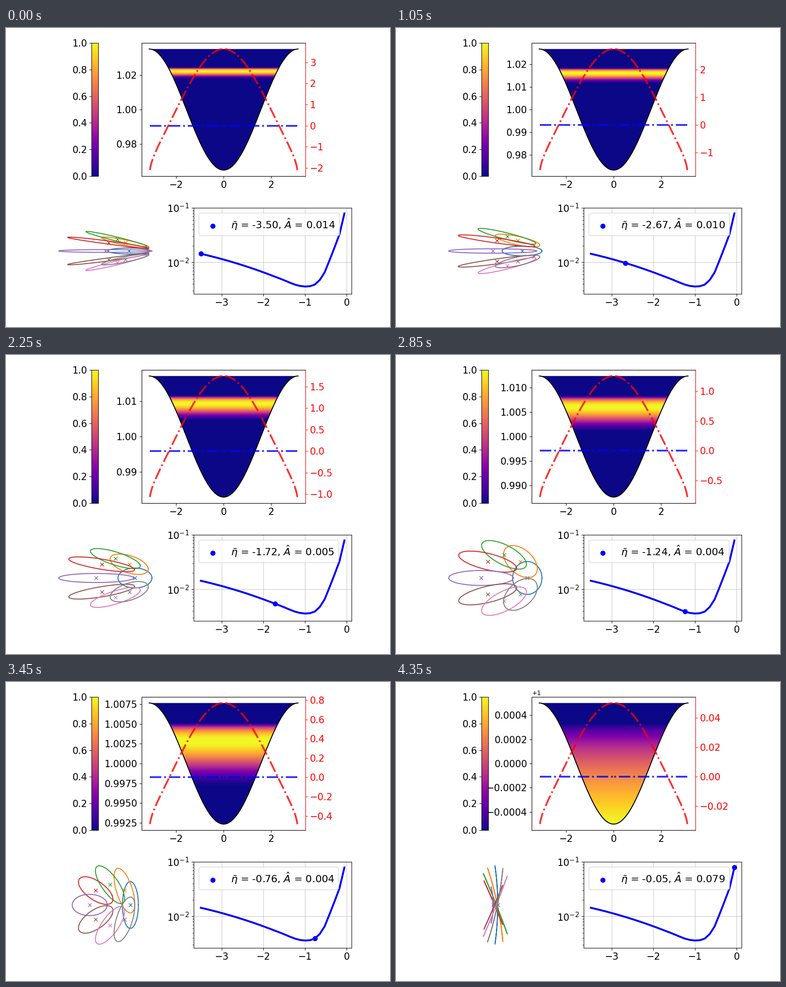
These frames come from a looping animation (849 px wide and 660 px high, 4.5 s). A matplotlib script:

```python
import numpy as np
import matplotlib.pyplot as plt
from matplotlib.animation import FuncAnimation
from matplotlib.patches import Polygon

W, H, DPI = 849, 660, 100
FRAMES, INTERVAL = 30, 150
TICK, TEXT = 15, 16
ETAS = np.linspace(-3.5, -0.05, FRAMES)
R_WELL, R_SURF = 0.01, 0.03      # radii for the field well and the surfaces
AMP, NFP = 0.045, 3              # helical axis: amplitude and field periods
MODES = 16
CUTOFF, FALLOFF = 0.52, 1.8      # drift at which the energy vanishes


# ---- magnetic axis and its surfaces ---------------------------------------
def axis_frame(phi):
    """Position, speed, curvature, torsion, normal and binormal of the axis."""
    c, s = AMP * np.cos(NFP * phi), AMP * np.sin(NFP * phi)
    R, n = 1 + c, NFP
    d1 = np.array([-n * s, R, n * c])
    d2 = np.array([-n**2 * c - R, -2 * n * s, -n**2 * s])
    d3 = np.array([n**3 * s + 3 * n * s, -3 * n**2 * c - R, -n**3 * c])
    cross = np.cross(d1, d2, axis=0)
    speed = np.sqrt((d1**2).sum(0))
    size = np.sqrt((cross**2).sum(0))
    b = cross / size
    normal = np.cross(b, d1 / speed, axis=0)
    return R, s, speed, size / speed**3, (cross * d3).sum(0) / size**2, normal, b


def solve_sigma(etas):
    """Sine coefficients of sigma for each eta, by Newton with warm starts."""
    k = NFP * np.arange(1, MODES + 1)
    phi = np.linspace(0, np.pi / NFP, MODES + 1)
    S, D = np.sin(np.outer(phi, k)), k * np.cos(np.outer(phi, k))
    G = axis_frame(np.linspace(0, 2 * np.pi, 600, endpoint=False))[2].mean()
    _, _, speed, kappa, tau, _, _ = axis_frame(phi)
    x, out = np.zeros(MODES + 1), []
    for eta in etas:
        q = (eta / kappa)**2
        for _ in range(15):
            iota, sig = x[0], S @ x[1:]
            h = q**2 + 1 + sig**2
            res = G / speed * (D @ x[1:]) + iota * h + 2 * q * tau * G
            jac = np.column_stack([h, (G / speed)[:, None] * D
                                   + 2 * iota * sig[:, None] * S])
            x = x - np.linalg.solve(jac, res)
        out.append(x[1:].copy())
    return out


def sections(eta, coef, count=8, points=121):
    """Surface cuts at fixed cylindrical angles over one field period."""
    target = (2 * np.pi / NFP * np.arange(count) / count)[:, None]
    th = np.linspace(0, 2 * np.pi, points)[None, :]
    k = NFP * np.arange(1, MODES + 1)
    phi = target + 0 * th
    for _ in range(50):
        R, Z, _, kappa, _, n, b = axis_frame(phi)
        sig = np.sin(phi[..., None] * k) @ coef
        X = R_SURF * eta / kappa * np.cos(th)
        Y = R_SURF * kappa / eta * (np.sin(th) + sig * np.cos(th))
        p = X * n + Y * b
        miss = phi + np.arctan2(p[1], R + p[0]) - target
        phi = phi - 0.7 * miss
    return np.hypot(R + p[0], p[1]), Z + p[2]


SIGMAS = solve_sigma(ETAS[::-1])[::-1]
CUTS = [sections(e, c) for e, c in zip(ETAS, SIGMAS)]
CUT_PHI = 2 * np.pi / NFP * np.arange(8) / 8
AXIS_R, AXIS_Z = 1 + AMP * np.cos(NFP * CUT_PHI), AMP * np.sin(NFP * CUT_PHI)

# ---- trapped particle drift ------------------------------------------------
BOUNCE = np.linspace(3.1126, 0, 160)
QUAD = (np.arange(1200) + 0.5) / 1200 * np.pi / 2
K2SIN2 = (np.sin(BOUNCE / 2)[:, None] * np.sin(QUAD))**2
DEPTH = -np.cos(BOUNCE)
ROWS = np.linspace(-1, 1, 400)


def drift(eta):
    """Bounce-averaged drift and bounce time for each turning point."""
    eps = R_WELL * abs(eta)
    c = 1 - 2 * K2SIN2
    B = 1 - eps * c
    w = 1 / (B * np.sqrt(1 - K2SIN2))
    lam = 1 / (1 + eps * DEPTH)[:, None]
    time = w.mean(1)
    return abs(eta) * (c * (2 / B - lam) * w).mean(1) / time, time


def energy(omega, time):
    e = time * np.clip(omega, 0, None) * np.clip(CUTOFF - omega, 0, None)**FALLOFF
    e = np.interp(ROWS, DEPTH[::-1], e[::-1])
    return (e / e.max())[:, None]


# ---- total available energy, as log10 per eta ------------------------------
smooth = np.polyfit([0, 7, 11, 15], [-1.842, -2.011, -2.129, -2.263], 3)
LOG_A = np.concatenate([np.polyval(smooth, np.arange(16)), [
    -2.297, -2.334, -2.372, -2.407, -2.431, -2.442, -2.437,
    -2.407, -2.324, -2.183, -1.959, -1.726, -1.485, -1.102]])
A_HAT = 10**LOG_A

# ---- figure ----------------------------------------------------------------
fig = plt.figure(figsize=(W / DPI, H / DPI), dpi=DPI, facecolor="white")


def add_axes(left, top, right, bottom):
    return fig.add_axes([left / W, 1 - bottom / H, (right - left) / W, (bottom - top) / H])


well = add_axes(300.2, 33, 662.2, 327)
bar = add_axes(189.4, 33, 204.1, 327)
cuts = add_axes(106.1, 397, 333, 587.4)
curve = add_axes(415, 397, 764.1, 587.4)

bar.imshow(np.linspace(0, 1, 256)[:, None], cmap="plasma", origin="lower",
           aspect="auto", extent=(0, 1, 0, 1))
bar.set_xticks([])
bar.yaxis.tick_left()
bar.tick_params(labelsize=TICK)

THETA = np.linspace(-np.pi, np.pi, 300)
well.set_xlim(-1.1 * np.pi, 1.1 * np.pi)
well.tick_params(labelsize=TICK)
image = well.imshow(np.zeros((len(ROWS), 1)), cmap="plasma", vmin=0, vmax=1,
                    origin="lower", aspect="auto", interpolation="bilinear",
                    extent=(-np.pi, np.pi, 0, 1))
field, = well.plot([], [], color="black", lw=1.5)

side = well.twinx()
side.tick_params(axis="y", labelsize=TICK, colors="red")
side.spines["right"].set_color("red")
style = dict(ls="-.", lw=2.85, alpha=0.8)
reds = [side.plot([], [], color="red", **style)[0] for _ in range(2)]
for sign in (-1, 1):
    side.plot(sign * BOUNCE, 0 * BOUNCE, color="blue", **style)

cuts.set_aspect("equal")
cuts.axis("off")
loops = []
for j in range(8):
    loops.append(cuts.plot([], [], color=f"C{j}", lw=1.5)[0])
    cuts.plot(AXIS_R[j], AXIS_Z[j], "x", color=f"C{j}")

curve.plot(ETAS, A_HAT, color="blue", lw=3)
dot = curve.scatter([ETAS[0]], [A_HAT[0]], s=50, color="blue", label="-", zorder=3)
curve.set_yscale("log")
curve.set_xlim(-3.6725, 0.1225)
curve.set_ylim(10**-2.581, 0.1)
curve.grid(alpha=0.7)
curve.tick_params(labelsize=TICK)
legend = curve.legend(loc="upper left", fontsize=TEXT)


def span(values):
    lo, hi = values.min(), values.max()
    pad = 0.05 * (hi - lo)
    return lo - pad, hi + pad


def draw(i):
    eta = ETAS[i]
    eps = R_WELL * abs(eta)
    B = 1 - eps * np.cos(THETA)
    omega, time = drift(eta)

    image.set_data(energy(omega, time))
    image.set_extent((-np.pi, np.pi, 1 - eps, 1 + eps))
    image.set_clip_path(Polygon(np.column_stack([THETA, B])).get_path(), well.transData)
    field.set_data(THETA, B)
    well.set_xlim(-1.1 * np.pi, 1.1 * np.pi)
    well.set_ylim(1 - 1.1 * eps, 1 + 1.1 * eps)

    for line, sign in zip(reds, (-1, 1)):
        line.set_data(sign * BOUNCE, omega)
    side.set_ylim(*span(omega))

    R, Z = CUTS[i]
    for line, x, y in zip(loops, R, Z):
        line.set_data(x, y)
    cuts.set_xlim(*span(R))
    cuts.set_ylim(*span(Z))

    dot.set_offsets([[eta, A_HAT[i]]])
    legend.get_texts()[0].set_text(
        rf"$\bar{{\eta}}$ = {eta:.2f}, $\hat{{A}}$ = {A_HAT[i]:.3f}")
    return []


anim = FuncAnimation(fig, draw, frames=FRAMES, interval=INTERVAL,
                     init_func=lambda: draw(0), repeat=True, repeat_delay=0, blit=False)
plt.show()
```
